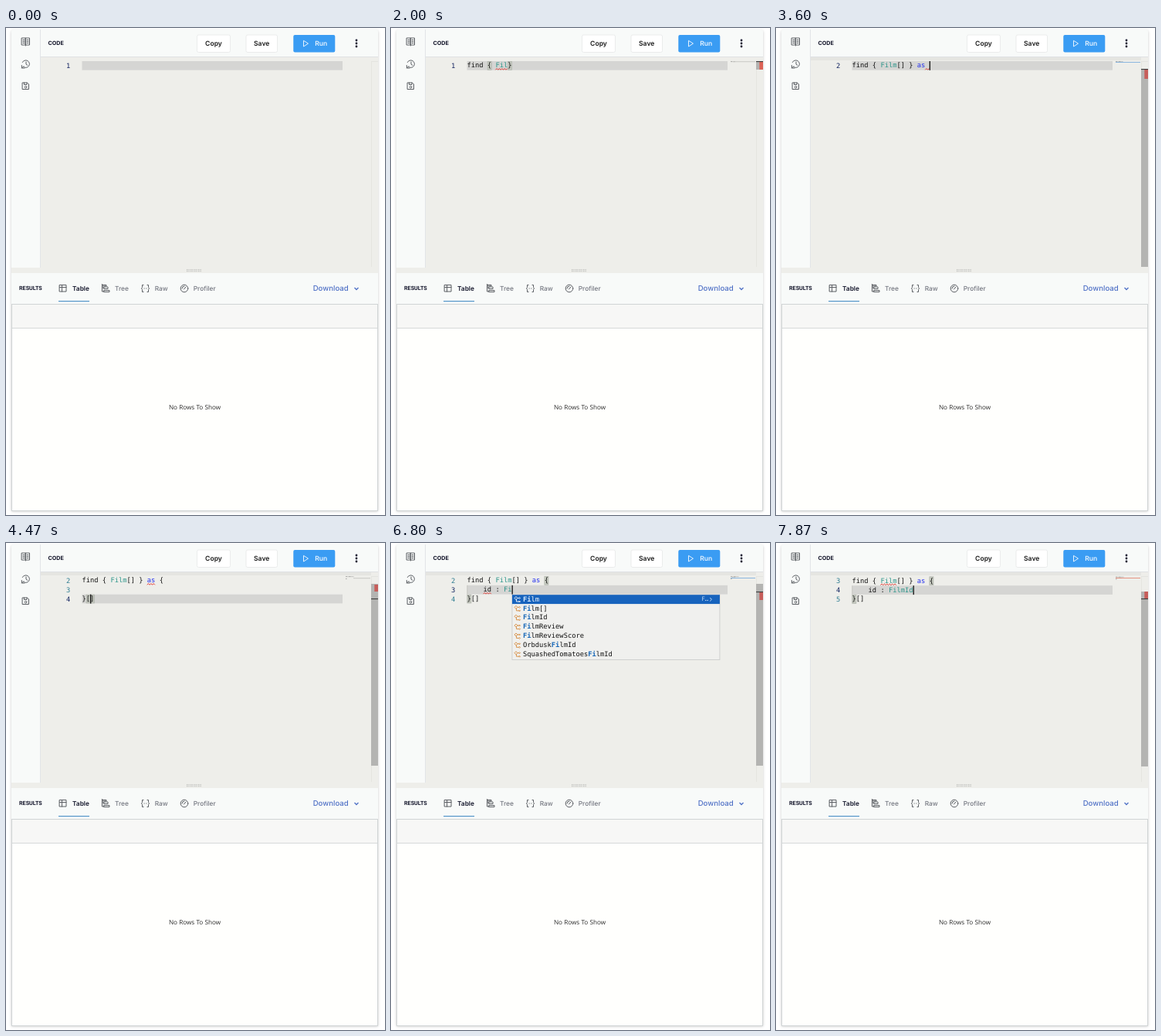
Recreate the animation shown at these times as an HTML page. Size 491 by 632 pixels, loop 8000 ms.

```html
<!DOCTYPE html>
<html lang="en">
<head>
<meta charset="utf-8">
<title>Query editor</title>
<style>
html, body { margin: 0; width: 100%; height: 100%; overflow: hidden; background: #fff; }
svg { display: block; }
text { font-family: Inter, sans-serif; text-rendering: geometricPrecision; white-space: pre; }
.label { font-weight: 700; fill: #15172c; }
.button { font-size: 8.6px; font-weight: 600; fill: #1c1c1c; }
.tab { font-size: 8.4px; font-weight: 500; fill: #747780; }
.icon { fill: none; stroke: #5b5e63; stroke-width: 1; stroke-linejoin: round; stroke-linecap: round; }
.mono text { font-family: "DejaVu Sans Mono", monospace; font-size: 8.75px; }
</style>
</head>
<body>
<svg width="491" height="632" viewBox="0 0 491 632">
  <defs>
    <filter id="soft" x="-5%" y="-5%" width="110%" height="110%"><feGaussianBlur stdDeviation="1.6"/></filter>
    <pattern id="dots" x="234" y="313" width="2.5" height="2.2" patternUnits="userSpaceOnUse">
      <rect width="1.3" height="1.2" fill="#b9bab7"/>
    </pattern>
  </defs>

  <rect x="6.5" y="3" width="476" height="625" rx="3" fill="#bbb" filter="url(#soft)" opacity=".6"/>
  <rect x="7" y="2" width="475" height="625" rx="3" fill="#f8faf9"/>
  <rect x="45" y="37" width="437" height="281" fill="#eeeeea"/>
  <rect x="7" y="311" width="475" height="7" fill="#eeeeea"/>
  <path d="M44.500 2V311M45 37.500H482" stroke="#dcdfe3" stroke-width=".8"/>
  <rect x="234" y="313" width="20" height="3.400" fill="url(#dots)"/>

  <g class="icon">
    <path d="M20.500 13H25.500V22H20.500ZM25.500 13H30.500V22H25.500ZM25.500 22V23M22 15.500H24M22 17.500H24M22 19.500H24M27 15.500H29M27 17.500H29M27 19.500H29"/>
    <path d="M21.300 44.500A4.800 4.800 0 1 1 22.800 50.600M20.300 48.500L20.500 52H24M20.500 52L23 49.500M26 44V47L28 48.500"/>
    <path d="M21.500 71H27.500L29.500 73V79.500H21.500ZM23.500 71V73.500H27V71"/><circle cx="25.500" cy="76.700" r="1.300"/>
  </g>

  <text class="label" x="54.500" y="22.200" font-size="7.200">CODE</text>
  <g fill="#fff" stroke="#e6e8e8" stroke-width=".8">
    <rect x="247.500" y="9" width="43" height="22.500" rx="2"/>
    <rect x="311" y="9" width="40.500" height="22.500" rx="2"/>
  </g>
  <rect x="372.300" y="9" width="54" height="22.400" rx="2" fill="#3a9cf3"/>
  <path d="M385.500 16.300V24L391.500 20.200Z" fill="none" stroke="#e6f2fe" stroke-linejoin="round"/>
  <g class="button" text-anchor="middle">
    <text x="269" y="23.200">Copy</text>
    <text x="331.200" y="23.200">Save</text>
    <text x="408.300" y="23.200" style="fill:#e6f2fe">Run</text>
  </g>
  <g fill="#1b1b35"><circle cx="454" cy="16" r="1.400"/><circle cx="454" cy="20" r="1.400"/><circle cx="454" cy="24" r="1.400"/></g>

  <text class="label" x="17" y="340" style="font:700 7.200px Roboto,sans-serif">RESULTS</text>
  <g class="icon">
    <path d="M69.500 333.500H78V342H69.500ZM69.500 336.500H78M72.500 333.500V342"/>
    <path d="M124.500 332.500V342H127M124.500 337H127M124.500 333.500H130V335H124.500M127 336H132V338.500H127ZM127 340.500H134V342.500H127Z"/>
    <path d="M178 333.500H176.500V336.500L175.500 338L176.500 339.500V342.500H178M183 333.500H184.500V336.500L185.500 338L184.500 339.500V342.500H183M179 338H179.300M181.700 338H182"/>
    <circle cx="231" cy="338" r="4.800"/><path d="M230.500 339L233 336M228 338A3 3 0 0 1 231 335"/>
  </g>
  <text class="button" x="86" y="341" style="font-size:8.300px;fill:#15172c">Table</text>
  <g class="tab">
    <text x="141" y="341">Tree</text>
    <text x="192.700" y="341">Raw</text>
    <text x="242.700" y="341">Profiler</text>
  </g>
  <rect x="68" y="354" width="40" height="1.100" fill="#4a8fc6"/>
  <text x="397.700" y="341.200" font-size="9.600" font-weight="500" fill="#5071c6">Download</text>
  <path d="M451.500 337L454 339.500L456.500 337" fill="none" stroke="#5071c6" stroke-width="1.300"/>

  <rect x="7.500" y="358.500" width="474" height="268" fill="#fffffd" stroke="#d0d4d5"/>
  <rect x="8" y="359" width="473" height="30" fill="#f7f7f6"/>
  <path d="M8 389.500H481" stroke="#d6d9d9"/>
  <text x="244.500" y="495" text-anchor="middle" style="font:400 8.200px 'Open Sans',sans-serif" fill="#2c2c2c">No Rows To Show</text>

  <path d="M473.500 43V310M473 43.500H482" stroke="#e2e2de" stroke-width=".8"/>
  <g id="editor" class="mono"></g>
</svg>

<script>
const LOOP = 8000, LEFT = 98.5, CHAR = 8.75 * 0.602, LINE = 11.86;
const GREY = "#c4c4c0", BLUE = "#7fb0de", RED = "#e58a78";
const TYPES = ["Film", "Film[]", "FilmId", "FilmReview", "FilmReviewScore", "OrbduskFilmId", "SquashedTomatoesFilmId"];

const HEAD = "find { Film[] } as ";
const block = (body, tail = "}[]") => [HEAD + "{", body, tail];
const braces = [[0, 19], [2, 0]];
const line = (text, col = text.length) => ({ code: [text], col });
const body = text => ({ code: block("    " + text), col: 4 + text.length });
const list = (col, query, sel = 0) => ({ popup: { col, query, sel } });
const loading = col => ({ popup: { col } });
const closed = { popup: null };
const strip = (x, y, color) => ({ strip: { x, y, color } });

// Each step changes part of the editor state at the given time.
const steps = [
  [0, { code: [""], first: 1, row: 0, col: 0, caret: false, errors: [], pairs: [],
        popup: null, slider: null, red: null, mark: null, strip: null }],
  [130, { caret: true }],
  [470, { ...line("f"), mark: 43, ...strip(443, 43.3, GREY) }],
  [530, { ...line("fi"), ...loading(2) }],
  [600, line("fin")],
  [670, line("find")],
  [730, { ...line("find "), ...closed }],
  [930, { ...line("find {}", 6), pairs: [[0, 5], [0, 6]] }],
  [1000, { ...line("find { }", 7), pairs: [[0, 5], [0, 7]] }],
  [1070, { errors: [[0, 0, 4]], slider: [43, 54], red: [43, 54] }],
  [1270, { ...line("find { F}", 8), pairs: [[0, 5], [0, 8]] }],
  [1330, { ...line("find { Fi}", 9), pairs: [[0, 5], [0, 9]] }],
  [1400, { ...line("find { Fil}", 10), pairs: [[0, 5], [0, 10]], ...loading(10) }],
  [1470, closed],
  [1730, { errors: [[0, 7, 3]] }],
  [2000, { caret: false }],
  [2200, loading(10)],
  [2470, { caret: true }],
  [2730, list(10, "Fil", 1)],
  [2800, { ...line("find { Film[]}", 13), ...closed, first: 2, pairs: [[0, 5], [0, 13]], errors: [],
           slider: [53, 310], red: null, mark: 53, ...strip(440, 44, BLUE) }],
  [2930, { ...line("find { Film[] }", 14), pairs: [[0, 5], [0, 14]] }],
  [3130, { col: 15 }],
  [3400, { ...line("find { Film[] } "), pairs: [] }],
  [3530, line("find { Film[] } as")],
  [3600, { ...line(HEAD), errors: [[0, 18, 1]], red: [54, 66] }],
  [3800, { ...line(HEAD + "{}", 20), pairs: [[0, 19], [0, 20]] }],
  [3930, { code: block("    ", "}"), row: 1, col: 4, pairs: braces, slider: [53, 289], mark: 63, ...strip(450, 45.3, GREY) }],
  [4000, { errors: [[0, 16, 2]], red: [54, 63] }],
  [4200, { code: block("", "}"), row: 2, col: 1 }],
  [4270, { mark: 72 }],
  [4470, { code: block(""), col: 2, pairs: [[2, 1], [2, 2]] }],
  [4530, { col: 3 }],
  [4730, { row: 1, col: 0, pairs: braces }],
  [4800, { mark: 63 }],
  [5130, body("")],
  [5270, { errors: [], red: null }],
  [5670, { caret: false }],
  [6070, { ...body("i"), caret: true }],
  [6130, body("id")],
  [6270, body("id ")],
  [6470, { ...body("id :"), errors: [[1, 4, 2]], red: [63, 74], ...strip(440, 45, BLUE) }],
  [6530, body("id : ")],
  [6670, body("id : F")],
  [6730, { ...body("id : Fi"), ...loading(11) }],
  [6800, list(11, "Fi")],
  [6930, { ...body("id : Fil"), ...list(11, "Fil") }],
  [7000, { ...body("id : Film"), ...list(11, "Film") }],
  [7200, { ...body("id : FilmI"), ...list(11, "FilmI") }],
  [7270, { ...body("id : FilmId"), ...list(11, "FilmId") }],
  [7670, { ...closed, errors: [] }],
  [7730, { first: 3, slider: [63, 290], red: null, mark: 72, ...strip(440, 45, BLUE) }],
  [7870, { errors: [[0, 7, 4]], red: [63, 73], ...strip(440, 45, RED) }]
];

const states = [];
steps.forEach(([, change], i) => states.push({ ...states[i - 1], ...change }));

const rect = (x, y, w, h, fill, more = "") =>
  `<rect x="${x}" y="${y}" width="${w}" height="${h}" fill="${fill}" ${more}/>`;
const text = (x, y, content, fill = "#111", more = "") =>
  `<text x="${x}" y="${y}" fill="${fill}" ${more}>${content}</text>`;
const stroke = (d, color, width = 0.9) =>
  `<path d="${d}" fill="none" stroke="${color}" stroke-width="${width}"/>`;
const colX = col => LEFT + col * CHAR;

const paint = source => source
  .replace(/\bF\w*/g, '<tspan fill="#2b9489">$&</tspan>')
  .replace(/\bas\b/g, '<tspan fill="#2430ee">$&</tspan>');

function squiggle(x, y, width) {
  let d = `M${x} ${y}`;
  for (let i = 1; i * 1.7 <= width; i++) d += `L${x + i * 1.7} ${y - (i % 2) * 1.7}`;
  return stroke(d, "#e23a33", 1);
}

function typeIcon(x, y, color) {
  return stroke(`M${x + 1} ${y + 4}l2 -2l2 2l-2 2zM${x + 5} ${y + 4}h1.500M${x + 3.5} ${y + 5.5}v3h3`, color) +
    stroke(`M${x + 6.5} ${y + 4}l1 -1l1 1l-1 1zM${x + 6.5} ${y + 8.5}l1 -1l1 1l-1 1z`, color, 1);
}

function drawPopup({ col, query, sel }, y) {
  const x = colX(col) + 0.5, width = 269;
  const names = query ? TYPES.filter(name => name.includes(query)) : ["Loading..."];
  let out = rect(x, y + 0.4, width, names.length * LINE + 1.4, "#f0f0ee", 'stroke="#c8c9c9" stroke-width=".8"');
  if (!query) return out + text(x + 4, y + 9.4, names[0]);
  names.forEach((name, i) => {
    const on = i === sel, top = y + 0.5 + i * LINE;
    if (on) out += rect(x, top, width, LINE, "#1763bd");
    const hit = `<tspan font-weight="700" fill="${on ? "#d8ebff" : "#1767b8"}">${query}</tspan>`;
    out += typeIcon(x + 2, top + 0.3, on ? "#fff" : "#d58a3c");
    out += text(x + 14, top + 8.5, name.replace(query, hit), on ? "#fff" : "#111");
    if (on) {
      out += text(x + 245.3, top + 8.2, "F…", "#bcd6f2", 'style="font-size:7.500px"');
      out += stroke(`M${x + 256.3} ${top + 3.8}l2.200 2.200l-2.200 2.200`, "#d8e8fa");
    }
  });
  return out;
}

function drawEditor(s) {
  const rowY = r => 43 + (s.first > 2 ? 0.4 : 0) + r * LINE;
  let out = s.first > 1 ? rect(45, 38, 428, 4, "#000", 'opacity=".04"') : "";

  out += rect(LEFT, rowY(s.row), 337.5, LINE - 0.2, "#d5d5d3");
  for (const [r, c] of s.pairs)
    out += rect(colX(c) + 0.3, rowY(r) + 0.4, CHAR - 0.2, LINE - 1, "#c6cac0", 'stroke="#b0b4ac" stroke-width=".7"');

  s.code.forEach((source, r) => {
    const y = rowY(r) + 8.3;
    out += text(83.3, y + 0.5, s.first + r, r === s.row ? "#12235f" : "#2f7d91", 'text-anchor="end"');
    if (source.startsWith("    ")) out += rect(LEFT, rowY(r), 0.7, LINE, "#bdbdba");
    out += text(LEFT, y, paint(source));
    for (const word of source.matchAll(/\S+/g))
      out += rect(440 + word.index * 0.52, rowY(0) + 0.2 + r * 1.4, word[0].length * 0.52, 0.9, "#555", 'opacity=".5"');
  });

  for (const [r, c, n] of s.errors) out += squiggle(colX(c), rowY(r) + 11.3, n * CHAR);
  if (s.caret) out += rect(colX(s.col) + 0.1, rowY(s.row), 1.2, LINE, "#000");

  if (s.strip) out += rect(s.strip.x, s.strip.y, 472 - s.strip.x, 0.9, s.strip.color);
  if (s.slider) out += rect(473, s.slider[0], 9, s.slider[1] - s.slider[0], "#b4b4b2");
  if (s.red) out += rect(477.3, s.red[0], 4.7, s.red[1] - s.red[0], s.first > 1 ? "#c65d5a" : "#dc6256");
  if (s.mark) out += rect(473, s.mark, 9, 1.1, "#3c3c3c");

  if (s.popup) out += drawPopup(s.popup, rowY(s.row + 1));
  return out;
}

const editor = document.getElementById("editor");
let shown = -1;
function tick() {
  const t = performance.now() % LOOP;
  const now = steps.findLastIndex(([start]) => start <= t);
  if (now !== shown) editor.innerHTML = drawEditor(states[shown = now]);
  requestAnimationFrame(tick);
}
tick();
</script>
</body>
</html>
```
